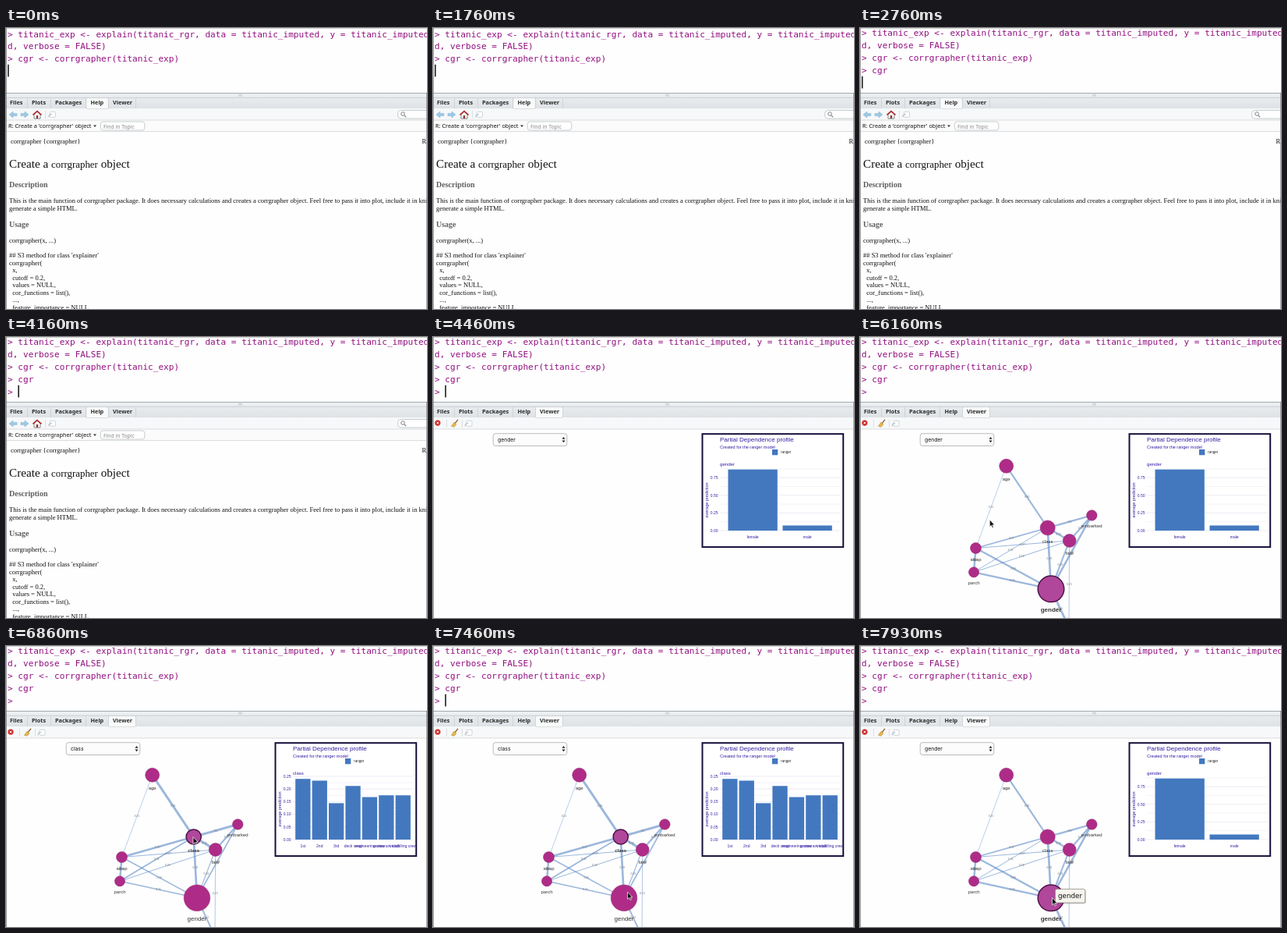
These frames come from a looping animation (540 px wide and 360 px high, 8 s). An HTML page:

```html
<!DOCTYPE html>
<html lang="en">
<head>
<meta charset="utf-8">
<title>Correlation graph in an R session</title>
<style>
  html, body { margin: 0; width: 100%; height: 100%; overflow: hidden; background: #fff; }
  svg { display: block; width: 540px; height: 360px; }
  text { white-space: pre; }
  .console { font: 11.08px "DejaVu Sans Mono", monospace; fill: #930f80; }
  .tabs { font: bold 7.3px "Noto Sans", sans-serif; fill: #2b2b2b; }
  .ui { font: 7.32px "Noto Sans", sans-serif; fill: #111; }
  .help { font: 8.5px "Liberation Serif", serif; fill: #111; }
  .help .h1 { font-size: 15.2px; }
  .help .h3 { font-size: 10px; font-weight: bold; fill: #606060; }
  .pick { font: 6.8px Inter, sans-serif; fill: #111; }
  .tip { font: 8.75px "DejaVu Sans", sans-serif; fill: #111; }
  .chart { font: 5px "Liberation Sans", sans-serif; fill: #371ea3; }
  .net { font: 6px "Liberation Sans", sans-serif; fill: #343434; text-anchor: middle; }
  .net .weight { font-size: 3.4px; fill: #777; }
  .net line { stroke: #4378bf; stroke-opacity: .52; }
  .net circle { fill: #ae2c87; stroke: #8d2470; stroke-width: .5; }
  .net .on circle { fill: #b0479a; stroke: #4d1046; stroke-width: 1.5; }
  .net .on text { font-weight: bold; }
</style>
</head>
<body>
<svg viewBox="0 0 540 360">
  <defs>
    <linearGradient id="bar" x2="0" y2="1"><stop stop-color="#e9ecee"/><stop offset="1" stop-color="#dee2e6"/></linearGradient>
    <clipPath id="plot"><rect x="347" y="125" width="178" height="143"/></clipPath>
  </defs>
  <rect width="540" height="360" fill="#fefefe"/>

  <g class="console" id="console">
    <text x="2" y="10">&gt; titanic_exp &lt;- explain(titanic_rgr, data = titanic_imputed, y = titanic_imputed</text>
    <text x="2" y="25.8">d, verbose = FALSE)</text>
    <text x="2" y="41.6">&gt; cgr &lt;- corrgrapher(titanic_exp)</text>
    <text x="2" y="57.6" id="typed"></text>
    <text x="2" y="73.6" id="prompt">&gt;</text>
  </g>
  <rect id="caret" width="1.5" height="15.6" fill="#111"/>

  <!-- pane frame -->
  <rect y="83" width="540" height="6.5" fill="#eceff1"/>
  <path d="M0 83.5H540" stroke="#a3a9ae" stroke-width="1"/>
  <path d="M298 85.5h5M298 87h5" stroke="#b0b5ba" stroke-width=".6"/>
  <rect y="89" width="540" height="14.3" fill="url(#bar)"/>
  <path d="M0 89.2H540" stroke="#b9bfc4" stroke-width=".7"/>
  <path d="M27.5 90V103M57.5 90V103M102.5 90V103M131.5 90V103M166.5 90V103" stroke="#c6ccd1" stroke-width=".7"/>
  <rect y="103.3" width="540" height="14.7" fill="#f7f8f9"/>
  <rect id="active" y="89.6" height="14" rx="2" fill="#f9fafa" stroke="#bcc3c8" stroke-width=".5"/>
  <g class="tabs">
    <text x="5" y="98.2">Files</text><text x="33" y="98.2">Plots</text><text x="63" y="98.2">Packages</text>
    <text x="108.5" y="98.2">Help</text><text x="137" y="98.2">Viewer</text>
  </g>

  <g id="helpPane">
    <path d="M4 111l5-4v2.4h5v3.2h-5v2.4zM29 111l-5-4v2.4h-5v3.2h5v2.4z" fill="#9cc9e4" stroke="#7fb1d0" stroke-width=".5"/>
    <path d="M36 111v5h8v-5l-4-3.6z" fill="#fff" stroke="#555" stroke-width=".7"/>
    <path d="M34.5 111.4l5.5-5 5.5 5" fill="none" stroke="#b3262a" stroke-width="1.5"/>
    <rect x="38.8" y="112" width="2.4" height="4" fill="#8a3a32"/>
    <path d="M50.5 106v10" stroke="#d0d4d8" stroke-width=".7"/>
    <rect x="56.5" y="107.3" width="7" height="7" rx="1" fill="#fff" stroke="#c3c9ce" stroke-width=".8"/>
    <path d="M54.8 114.3q0-4 4-4" fill="none" stroke="#b3c4d0" stroke-width="1.2"/>
    <rect x="502.5" y="105.5" width="50" height="10.5" rx="4" fill="#fff" stroke="#b4b9bd" stroke-width=".7"/>
    <circle cx="509" cy="110" r="2.3" fill="none" stroke="#777" stroke-width=".9"/>
    <path d="M510.7 111.8l2.5 2.4" stroke="#777" stroke-width="1.1"/>
    <rect y="118" width="540" height="14.5" fill="#fbfbfc"/>
    <path d="M0 118H540M0 132.6H540" stroke="#c9ced2" stroke-width=".7"/>
    <text class="ui" x="3" y="128">R: Create a 'corrgrapher' object</text>
    <path d="M112 124.5h4l-2 2.6z" fill="#333"/>
    <rect x="121.3" y="120" width="56.5" height="11" rx="3" fill="#fff" stroke="#b4b9bd" stroke-width=".7"/>
    <text class="ui" x="125" y="128.6" style="font-size:6.8px;fill:#888">Find in Topic</text>
    <g class="help" id="help">
      <text x="6" y="148">corrgrapher {corrgrapher}</text><text x="533.5" y="148">R Documentation</text>
      <text x="4" y="179" class="h1">Create a <tspan font-size="12.9">corrgrapher</tspan> object</text>
      <text x="4" y="204.2" class="h3">Description</text>
      <text x="4" y="224">This is the main function of corrgrapher package. It does necessary calculations and creates a corrgrapher object. Feel free to pass it into plot, include it in knitr</text>
      <text x="4" y="233.6">generate a simple HTML.</text>
      <text x="4" y="254.8" class="h3">Usage</text>
      <text x="4" y="275">corrgrapher(x, ...)</text>
    </g>
  </g>

  <g id="viewerPane">
    <path d="M0 118H540" stroke="#c9ced2" stroke-width=".7"/>
    <circle cx="6" cy="110.1" r="3.6" fill="#cf2a27"/>
    <path d="M4.6 108.7l2.8 2.8m0-2.8l-2.8 2.8" stroke="#fff" stroke-width="1"/>
    <path d="M17.5 106v10M37.5 106v10" stroke="#d0d4d8" stroke-width=".7"/>
    <path d="M32 105.8l-4 5" stroke="#8a5a2b" stroke-width="1.3"/>
    <path d="M27 109.3l3 2.5-3 3.5-3.5-1z" fill="#e8b84a" stroke="#a87b28" stroke-width=".5"/>
    <rect x="43" y="107.3" width="7" height="7" rx="1" fill="#fff" stroke="#c3c9ce" stroke-width=".8"/>
    <path d="M41.3 114.3q0-4 4-4" fill="none" stroke="#b3c4d0" stroke-width="1.2"/>
    <g id="widgets">
      <rect x="77.2" y="123.7" width="94.6" height="15.8" rx="3" fill="#fcfcfc" stroke="#aaa" stroke-width=".8"/>
      <text class="pick" id="pick" x="83" y="134.2"></text>
      <path d="M165.5 130.8h4l-2-2.8zM165.5 132.4h4l-2 2.8z" fill="#222"/>
      <rect x="345.5" y="124.2" width="180.7" height="144.9" fill="#fff" stroke="#160e3b" stroke-width="2"/>
      <g class="chart" clip-path="url(#plot)">
        <text x="368" y="134.3" font-size="8.06">Partial Dependence profile</text>
        <text x="368" y="142.9" font-size="5.53">Created for the ranger model</text>
        <rect x="435" y="144" width="7.3" height="7.3" fill="#4378bf"/>
        <text x="446.3" y="149.3" font-size="4.5" fill="#222">ranger</text>
        <text transform="translate(353.4 209) rotate(-90)" text-anchor="middle" font-size="5.5">average prediction</text>
        <g id="genderPlot"></g><g id="classPlot"></g>
      </g>
    </g>
    <g class="net" id="net"></g>
    <g id="tip">
      <rect x="251.4" y="312.6" width="38.5" height="17.6" rx="2" fill="#000" opacity=".18"/>
      <rect x="250.4" y="311.4" width="38.3" height="17.6" rx="2" fill="#f5f4ed" stroke="#808074" stroke-width=".7"/>
      <text class="tip" x="254" y="323.3">gender</text>
    </g>
  </g>

  <path d="M.4 0V360M539.7 83V360" stroke="#777" stroke-width=".8"/>
  <path d="M0 .3H540" stroke="#999" stroke-width=".6"/>
  <path id="arrow" d="M0 0V9.2L2.1 7.3 3.5 10.5 5 9.9 3.6 6.8H6.4Z" fill="#111" stroke="#fff" stroke-width=".7"/>
  <path id="beam" d="M-2-5.5Q0-5.5 0-4V4Q0 5.5-2 5.5M2-5.5Q0-5.5 0-4M0 4Q0 5.5 2 5.5" fill="none" stroke="#222" stroke-width=".9"/>
</svg>
<script>
const $ = id => document.getElementById(id);
const show = (el, on) => el.setAttribute('visibility', on ? 'inherit' : 'hidden');

function add(parent, tag, attrs, text) {
  const el = document.createElementNS('http://www.w3.org/2000/svg', tag);
  for (const k in attrs) el.setAttribute(k, attrs[k]);
  if (text) el.textContent = text;
  parent.appendChild(el);
  return el;
}

["## S3 method for class 'explainer'", 'corrgrapher(', '  x,', '  cutoff = 0.2,', '  values = NULL,',
 '  cor_functions = list(),', '  ...,', '  feature_importance = NULL,']
  .forEach((s, i) => add($('help'), 'text', { x: 4, y: 294 + i * 9.55 }, s));

// bar chart: value step and pixel step of the ticks, then bar layout
const BASE = 248, TOP = 166;
function plot(g, name, tick, gap, x0, pitch, width, bars) {
  add(g, 'text', { x: 368, y: 165.3, 'font-size': 6.1 }, name);
  for (let i = 0; BASE - i * gap > TOP; i += .5) {
    const y = BASE - i * gap, major = i % 1 === 0;
    add(g, 'path', { d: `M368 ${y}H522`, stroke: '#e6e7f3', 'stroke-width': major ? .8 : .5 });
    if (major) add(g, 'text', { x: 365.6, y: y + 1.7, 'text-anchor': 'end' }, (i * tick).toFixed(2));
  }
  bars.forEach(([label, value], i) => {
    const h = value / tick * gap, x = x0 + i * pitch;
    add(g, 'rect', { x, y: BASE - h, width, height: h, fill: '#4378bf' });
    add(g, 'text', { x: x + width / 2, y: 257.7, 'text-anchor': 'middle' }, label);
  });
}
plot($('genderPlot'), 'gender', .25, 22.6, 378.5, 70, 63.3, [['female', .866], ['male', .072]]);
plot($('classPlot'), 'class', .05, 16.2, 371.2, 21.4, 19.3, [
  ['1st', .24], ['2nd', .233], ['3rd', .144], ['deck crew', .212],
  ['engineering crew', .168], ['restaurant staff', .175], ['victualling crew', .175]]);

// name: x, y, radius, label baseline
const nodes = {
  age: [187.7, 165.3, 9, 184.3], class: [240.7, 244.5, 9.6, 264], embarked: [297.3, 228.5, 6.8, 244.3],
  fare: [268.7, 261, 8.4, 279], sibsp: [148.5, 270.5, 7, 287], parch: [146, 301.3, 6.6, 317],
  gender: [245, 322.8, 16.8, 351.8], survived: [268, 372, 9, 390]
};
const edges = [
  ['age', 'class', 2.2, '0.60'], ['age', 'sibsp', .7, '0.25'], ['class', 'embarked', 2.3, '0.5'],
  ['class', 'fare', 2.4, '0.72'], ['class', 'sibsp', 1.8, '0.37'], ['class', 'parch', 1, '0.31'],
  ['class', 'gender', 1.9, '0.39'], ['fare', 'embarked', 2.2, '0.45'], ['fare', 'gender', 1.2, '0.29'],
  ['fare', 'sibsp', 1, '0.27'], ['fare', 'parch', 1, '0.28'], ['sibsp', 'parch', 2.5, '0.54'],
  ['sibsp', 'gender', 1.5, '0.36'], ['parch', 'gender', 1.6, '0.35'], ['embarked', 'gender', 1.7, '0.33'],
  ['fare', 'survived', .8, '0.23'], ['gender', 'survived', 1.9, '0.53']
];
const net = $('net');
const lines = edges.map(([a, b]) => {
  const [x1, y1] = nodes[a], [x2, y2] = nodes[b];
  return add(net, 'line', { x1, y1, x2, y2 });
});
for (const [a, b, , label] of edges) {
  const [x1, y1] = nodes[a], [x2, y2] = nodes[b];
  add(net, 'text', { class: 'weight', x: (x1 + x2) / 2, y: (y1 + y2) / 2 + 1.2 }, label);
}
const groups = {};
for (const name in nodes) {
  const [cx, cy, r, y] = nodes[name], g = groups[name] = add(net, 'g', {});
  add(g, 'circle', { cx, cy, r });
  add(g, 'text', { x: cx, y, 'font-size': name === 'gender' ? 8 : 6 }, name);
}

let chosen;
function choose(name) {
  if (name === chosen) return;
  chosen = name;
  $('pick').textContent = name;
  for (const n in groups) groups[n].setAttribute('class', n === name ? 'on' : '');
  edges.forEach(([a, b, w], i) => lines[i].setAttribute('stroke-width', a === name || b === name ? w + .8 : w));
}

const LOOP = 8000;
const blink = [[0, 360], [760, 1360], [1760, 2260], [2760, 3360], [3760, 4760], [5200, 5800], [6200, 6800], [7200, 7760]];
const easeIn = u => u ** 1.5, easeOut = u => 1 - (1 - u) ** 2;
// time, x, y, easing towards this point
const path = [
  [5400, 181, 0], [5800, 173, 68, easeOut], [5960, 173, 68, easeOut], [6160, 166, 234, easeIn],
  [6660, 240, 244.5, easeOut], [7130, 240, 244.5, easeOut], [7340, 261, 286, easeIn], [7560, 246.5, 322.5, easeOut]
];

function pointerAt(t) {
  const i = path.findIndex(p => p[0] > t);
  if (i < 0) return path[path.length - 1].slice(1, 3);
  const [t0, x0, y0] = path[i - 1], [t1, x1, y1, ease] = path[i];
  const u = ease((t - t0) / (t1 - t0));
  return [x0 + (x1 - x0) * u, y0 + (y1 - y0) * u];
}

function render(t) {
  const viewer = t >= 4200, ready = t >= 4160;

  $('console').setAttribute('transform', `translate(0 ${t < 2260 ? 1.5 : 0})`);
  $('typed').textContent = t < 2260 ? '' : t < 2300 ? '>' : '> cgr';
  show($('prompt'), ready);
  show($('caret'), blink.some(([a, b]) => t >= a && t < b));
  $('caret').setAttribute('x', ready ? 15.4 : 2.2);
  $('caret').setAttribute('y', t < 2260 ? 46.8 : 61.8);

  $('active').setAttribute('x', viewer ? 131.5 : 102.8);
  $('active').setAttribute('width', viewer ? 35 : 28.5);
  show($('helpPane'), !viewer);
  show($('viewerPane'), viewer);
  show($('widgets'), t >= 4460);
  show(net, t >= 4500);

  choose(t >= 6800 && t < 7900 ? 'class' : 'gender');
  const byClass = t >= 6860 && t < 7930;
  show($('classPlot'), byClass);
  show($('genderPlot'), !byClass);
  show($('tip'), t >= 7900);

  const moving = t >= 5400, [x, y] = moving ? pointerAt(t) : [0, 0];
  show($('arrow'), moving && y > 83);
  show($('beam'), moving && y <= 83);
  for (const id of ['arrow', 'beam']) $(id).setAttribute('transform', `translate(${x} ${y})`);
}

const start = performance.now();
function tick() {
  render((performance.now() - start) % LOOP);
  requestAnimationFrame(tick);
}
tick();
</script>
</body>
</html>
```
